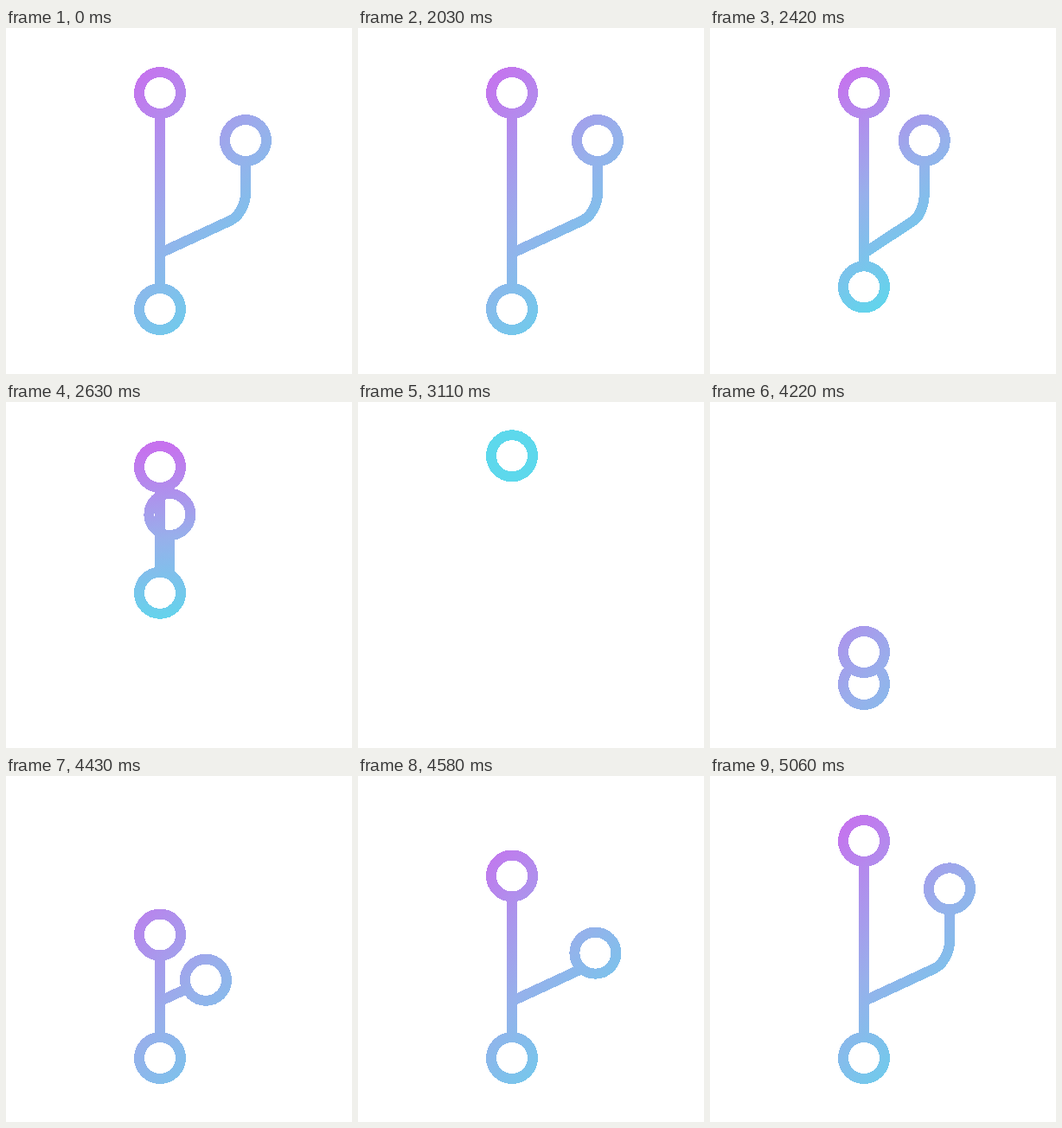
An HTML page for the animation above (5120 ms loop, 400 by 400 pixels).

```html
<!DOCTYPE html>
<html lang="en">
<head>
<meta charset="utf-8">
<title>Branch</title>
<style>
  html, body { margin: 0; width: 100%; height: 100%; overflow: hidden; background: #fff; }
  svg { display: block; width: 100%; height: 100%; }
</style>
</head>
<body>
<svg viewBox="0 0 400 400" fill="none" stroke="url(#tint)" stroke-width="12" shape-rendering="crispEdges">
  <defs>
    <linearGradient id="tint" gradientUnits="userSpaceOnUse">
      <stop offset="0" stop-color="#c672ee"/>
      <stop offset=".5" stop-color="#97b0eb"/>
      <stop offset="1" stop-color="#5dd8ec"/>
    </linearGradient>
  </defs>
  <path id="branch"/>
  <circle id="side" r="24" fill="#fff"/>
  <path id="trunk"/>
  <circle id="bottom" r="24" fill="#fff"/>
  <circle id="top" r="24" fill="#fff"/>
</svg>
<script>
const LOOP = 5120, START = 2030, STEP = 30;
const X = 178, SIDE_X = 277, SIDE_Y = 130, TOP = 75, PEAK = 57, LOW = 325, FLOOR = 326, JOINT = 260.3;
const DROP = 3250, FORK = 4306, FORK_TIME = 800;
const TINT_X = 148, TINT_Y = 57, TINT_SIZE = 210;

const [tint, branch, side, trunk, bottom, top_] =
  ['tint', 'branch', 'side', 'trunk', 'bottom', 'top'].map(id => document.getElementById(id));

const set = (el, attrs) => { for (const k in attrs) el.setAttribute(k, attrs[k]); };
const mix = (a, b, p) => a + (b - a) * p;
const clamp = v => Math.min(1, Math.max(0, v));

// cubic-bezier(.75, 0, .25, 1), solved by bisection
function ease(t, start, duration) {
  const x = clamp((t - start) / duration);
  let lo = 0, hi = 1;
  for (let i = 0; i < 24; i++) {
    const u = (lo + hi) / 2, v = 1 - u;
    if (2.25 * v * v * u + 0.75 * v * u * u + u * u * u < x) lo = u; else hi = u;
  }
  return lo * lo * (3 - 2 * lo);
}

function branchPath(spread, end) {
  const x = v => mix(X, v, spread), y = v => Math.min(v, end);
  return `M${X} ${end}L${x(259)} ${y(222.8)}C${x(270)} ${y(217.5)} ${x(SIDE_X)} ${y(204)} ` +
    `${x(SIDE_X)} ${y(190)}V${y(SIDE_Y)}`;
}

function pose(t) {
  if (t < START) return { topY: TOP, lowY: LOW, sideX: SIDE_X, sideY: SIDE_Y, spread: 1, grown: 1 };
  if (t < DROP) {
    const lowY = mix(LOW, PEAK, ease(t, 2013, 1310));
    const spread = 1 - ease(t, 2015, 920);
    return {
      topY: Math.min(TOP, lowY), lowY, spread, grown: 1,
      sideX: mix(X, SIDE_X, spread), sideY: Math.min(SIDE_Y, lowY)
    };
  }
  const fall = mix(PEAK, FLOOR, ease(t, 3482, 510));
  const rise = mix(FLOOR, TOP, ease(t, 3737, 1340));
  const topY = Math.min(fall, rise);
  const grown = t < FORK ? 0 : 1 - Math.pow(1 - clamp((t - FORK) / FORK_TIME), 2.2);
  return {
    topY, lowY: mix(PEAK, FLOOR, ease(t, DROP, 490)),
    sideX: X, sideY: topY, spread: 1, grown
  };
}

// the gradient narrows with the branch, flattens with the trunk and follows the top ring
function drawTint({ topY, lowY, spread }) {
  const shift = 0.225 * Math.max(0, topY - TOP);
  const reach = clamp((lowY - 63) / 160);
  const x1 = TINT_X + shift, y1 = TINT_Y + shift;
  set(tint, {
    x1, y1,
    x2: x1 + TINT_SIZE * Math.min(spread, reach),
    y2: y1 + TINT_SIZE * reach
  });
}

function draw(t) {
  const p = pose(t);
  set(branch, { d: branchPath(p.spread, Math.min(JOINT, p.lowY)), visibility: p.grown ? 'visible' : 'hidden' });
  if (p.grown > 0 && p.grown < 1) {
    const length = branch.getTotalLength(), tip = branch.getPointAtLength(length * p.grown);
    set(branch, { 'stroke-dasharray': `${length * p.grown} ${length}` });
    p.sideX = tip.x;
    p.sideY = tip.y;
  } else {
    branch.removeAttribute('stroke-dasharray');
    if (t >= FORK && p.grown) { p.sideX = SIDE_X; p.sideY = SIDE_Y; }
  }
  set(side, { cx: p.sideX, cy: p.sideY });
  set(trunk, { d: `M${X} ${p.topY}V${p.lowY}` });
  set(bottom, { cx: X, cy: p.lowY });
  set(top_, { cx: X, cy: p.topY });
  drawTint(p);
}

const began = performance.now();
function tick() {
  const t = (performance.now() - began) % LOOP;
  draw(t < START ? 0 : START + Math.floor((t - START) / STEP) * STEP);
  requestAnimationFrame(tick);
}
tick();
</script>
</body>
</html>
```
